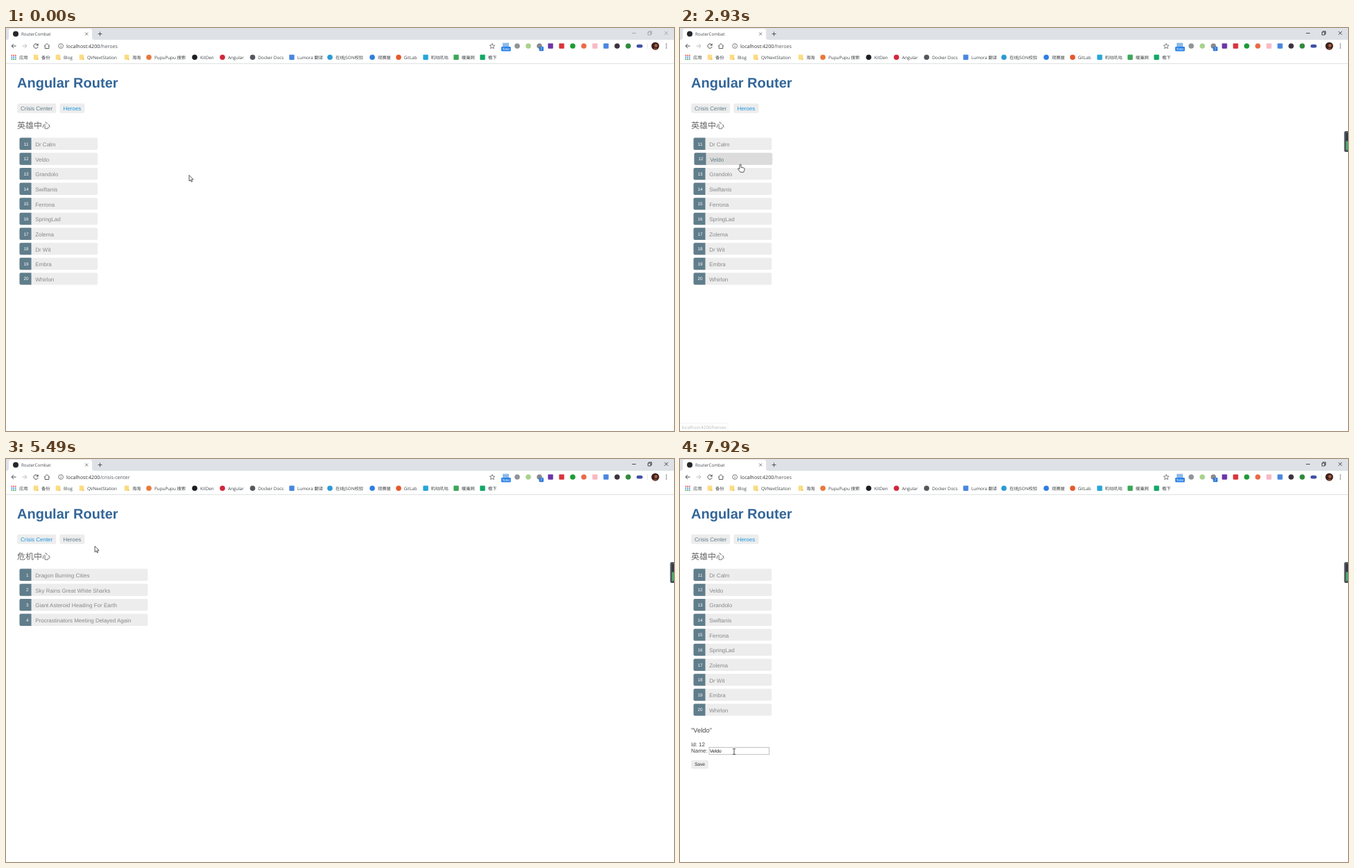
Write an HTML page that moves like this. It is 963 px wide and 582 px high and loops after 8000 ms.

```html
<!DOCTYPE html>
<html lang="en">
<head>
<meta charset="utf-8">
<title>RouterCombat</title>
<style>
  html, body { margin: 0; width: 100%; height: 100%; overflow: hidden; background: #fff; }
  svg { display: block; width: 963px; height: 582px; }
  text { white-space: pre; text-rendering: geometricPrecision; }
  .ui { font-family: "Open Sans", "Noto Sans CJK SC", "Noto Sans CJK", sans-serif; }
  .page { font-family: "Liberation Sans", "Noto Sans CJK SC", "Noto Sans CJK", sans-serif; }
</style>
</head>
<body>
<svg viewBox="0 0 963 582" xmlns="http://www.w3.org/2000/svg">
  <g id="chrome" class="ui"></g>
  <g id="page" class="page"></g>
  <g id="overlay" class="ui"></g>
</svg>
<script>
const LOOP = 8000;
const $ = id => document.getElementById(id);

const rect = (x, y, w, h, fill, extra = '') =>
  `<rect x="${x}" y="${y}" width="${w}" height="${h}" fill="${fill}" ${extra}/>`;
const dot = (x, y, r, fill) => `<circle cx="${x}" cy="${y}" r="${r}" fill="${fill}"/>`;
const text = (x, y, size, fill, str, extra = '') =>
  `<text x="${x}" y="${y}" font-size="${size}" fill="${fill}" ${extra}>${str}</text>`;
const line = (d, stroke, width = 1) =>
  `<path d="${d}" fill="none" stroke="${stroke}" stroke-width="${width}"/>`;

// ---- browser frame -------------------------------------------------

const bookmarks = [
  [11, 'apps', '#4285f4', '应用', 19],
  [43, 'folder', '', '备份', 51],
  [75, 'folder', '', 'Blog', 83],
  [109, 'folder', '', 'QVNextStation', 117],
  [174, 'folder', '', '海淘', 182],
  [206, 'dot', '#e8793a', 'PupuPupu 搜索', 214],
  [272, 'dot', '#1b1f23', 'KitDen', 280],
  [312, 'dot', '#d3273a', 'Angular', 320],
  [355.5, 'dot', '#55595e', 'Docker Docs', 363.5],
  [412, 'square', '#4a86e0', 'Lumora 翻译', 420],
  [467, 'dot', '#2c9ad6', '在线JSON校验', 475],
  [528, 'dot', '#2f7de0', '观赛屋', 536],
  [566, 'dot', '#e5582b', 'GitLab', 573.5],
  [605, 'square', '#27a5d8', '叽咕叽咕', 612.5],
  [649, 'square', '#3aa757', '暖巢网', 657],
  [687, 'square', '#12a866', '檐下', 695],
];

const extensions = [
  [737, 'dot', '#8f9499'], [753, 'dot', '#a9d18c'], [769, 'dot', '#8a8a8a'],
  [785, 'square', '#6a35a8'], [801, 'square', '#d8343c'], [817, 'dot', '#1d9a35'],
  [833, 'dot', '#ea6a45'], [849, 'square', '#f7b9c6'], [865, 'square', '#4a86e0'],
  [881, 'dot', '#3b3340'], [897, 'dot', '#2f8a3c'],
];

function icon(kind, x, y, color) {
  if (kind === 'dot') return dot(x, y, 3.8, color);
  if (kind === 'square') return rect(x - 3.7, y - 3.7, 7.4, 7.4, color, 'rx="1"');
  if (kind === 'folder') return rect(x - 3.3, y - 3.8, 6.6, 7.3, '#fbdc83', 'rx=".6"') +
    rect(x + 1, y + 1.6, 2.6, 2, '#f3c95c');
  const colors = ['#e34b3f', '#4285f4', '#34a060'];
  let out = '';
  for (let i = 0; i < 9; i++)
    out += rect(x - 3.5 + i % 3 * 2.7, y - 3.6 + (i / 3 | 0) * 2.7, 1.7, 1.7, colors[i / 3 | 0]);
  return out;
}

function drawFrame() {
  const ink = '#4a4d51';
  let s = rect(0, 0, 963, 17, '#dee1e6') + rect(0, 17, 963, 35, '#fff');
  s += '<path d="M1 17Q4 17 4 14V4Q4 1 7 1H121Q124 1 124 4V14Q124 17 127 17Z" fill="#fff"/>';
  s += dot(14, 8.5, 4, '#24272b') + text(22, 10.9, 6.2, '#45494d', 'RouterCombat');
  s += line('M114.2 6.5l4 4m0-4l-4 4', '#55585c', .8) + line('M132.5 8.5h6m-3-3v6', '#45484c', .9);

  s += line('M14.5 26h-6.5m3-3l-3 3l3 3', ink, 1);
  s += line('M23.5 26h6.5m-3-3l3 3l-3 3', '#babcbe', 1);
  s += line('M45.6 24A3.2 3.2 0 1 0 46.2 27', ink, 1) + '<path d="M46.6 22.3v3.2h-3.2z" fill="#4a4d51"/>';
  s += line('M55 26.3l4-3.8l4 3.8m-6.8-1v4.2h5.6v-4.2', ink, .9);
  s += line('M82.5 26a3.4 3.4 0 1 0-6.8 0a3.4 3.4 0 1 0 6.8 0M79.1 25.4v2.6M79.1 23.7v.9', ink, .7);
  s += line('M701 22.4l1.1 2.5 2.7.2-2.1 1.8.7 2.7-2.4-1.4-2.4 1.4.7-2.7-2.1-1.8 2.7-.2z', ink, .7);

  s += rect(716, 21.5, 9, 6, '#8dbbe8') + rect(714, 27, 13.7, 6.4, '#2680e8', 'rx="1"');
  s += text(720.8, 32, 5, '#fff', 'New', 'text-anchor="middle"');
  for (const [x, kind, color] of extensions) s += icon(kind, x, 26, color);
  s += rect(768.5, 27, 6.5, 6.3, '#2f7ad8', 'rx="1"') + text(771.7, 32, 5, '#fff', '7', 'text-anchor="middle"');
  s += rect(909, 23.8, 8.8, 4.8, '#3f4fa5', 'rx="2.4"');
  s += rect(924, 22, .6, 8, '#d5d7da');
  s += dot(936, 26, 5.6, '#3d211c') + dot(937, 25.4, 2.3, '#a55f43') +
    '<path d="M932.5 30.2q4-3.4 7.4 0q-3.6 2.6-7.4 0z" fill="#75402f"/>';
  for (const y of [23.3, 26, 28.7]) s += dot(952, y, .8, ink);

  for (const [x, kind, color, label, tx] of bookmarks)
    s += icon(kind, x, 42.3, color) + text(tx, 44.8, 6.3, '#3c4043', label);
  s += rect(0, 51, 963, .8, '#d9dbdd');
  $('chrome').innerHTML = s;
}

// ---- page ----------------------------------------------------------

const heroes = ['Dr Calm', 'Veldo', 'Grandolo', 'Swiftanis', 'Ferrona',
  'SpringLad', 'Zolema', 'Dr Wit', 'Embra', 'Whirlon'];
const crises = ['Dragon Burning Cities', 'Sky Rains Great White Sharks',
  'Giant Asteroid Heading For Earth', 'Procrastinators Meeting Delayed Again'];
const rowY = i => 158.6 + i * 21.65;

const areas = {
  crisis: { x: 16, y: 109, w: 56.3, h: 13.7 },
  heroes: { x: 77.4, y: 109, w: 36, h: 13.7 },
  input: { x: 42, y: 416.5, w: 86.6, h: 10.3 },
};
const inside = (p, { x, y, w, h }) => p.x >= x && p.x <= x + w && p.y >= y && p.y <= y + h;

function navLink(name, label, active, hover) {
  const { x, y, w, h } = areas[name];
  return rect(x, y, w, h, hover ? '#cfd8dc' : '#ededed', 'rx="2"') +
    text(x + 5, 118.5, 8, active || hover ? '#1c96e2' : '#607d8b', label);
}

function row(i, id, label, width, hover) {
  const y = rowY(i), x = hover ? 20.5 : 19.5;
  return rect(x, y, width, 17.4, hover ? '#dcdcdc' : '#ededed', 'rx="2"') +
    `<path d="M${x + 17} ${y}h-15q-2 0-2 2v13.4q0 2 2 2h15z" fill="#607d8b"/>` +
    text(x + 13, y + 11, 6.4, '#fff', id, 'text-anchor="end"') +
    text(x + 22.7, y + 12.4, 8, hover ? '#607d8b' : '#888', label);
}

function detail() {
  const { x, y, w, h } = areas.input;
  const name = heroes[1];
  return text(16, 395.3, 9.36, '#444', `"${name}"`) +
    text(16, 414.6, 8, '#444', 'Id: 12') + text(16, 424.2, 8, '#444', 'Name:') +
    rect(x, y, w, h, '#fff', 'stroke="#a5a5a5" stroke-width=".7"') +
    text(43, 424, 6.67, '#111', name) +
    rect(16, 435, 25, 12.4, '#ededed', 'rx="2"') + text(20.9, 443.4, 6.67, '#333', 'Save');
}

function drawPage(view) {
  const onCrisis = view.route === 'crisis-center';
  let s = text(16, 85.7, 20, '#336699', 'Angular Router', 'font-weight="bold"');
  s += navLink('crisis', 'Crisis Center', onCrisis, view.target === 'crisis');
  s += navLink('heroes', 'Heroes', !onCrisis, view.target === 'heroes');
  s += text(16, 145.2, 12, '#666', onCrisis ? '危机中心' : '英雄中心', 'font-weight="300"');
  const list = onCrisis ? crises : heroes;
  list.forEach((label, i) => {
    s += row(i, i + (onCrisis ? 1 : 11), label, onCrisis ? 185 : 112.7, view.target === i);
  });
  return s + (view.detail ? detail() : '');
}

// ---- timeline ------------------------------------------------------

// Bursts of screen updates: start, end, number of updates.
const bursts = [[0, 0, 1], [530, 620, 2], [770, 1390, 9], [1550, 2240, 10], [2390, 2390, 1],
  [2560, 3160, 9], [3320, 3320, 1], [4010, 4470, 7], [4620, 4700, 2], [4850, 5170, 5],
  [5340, 6130, 11], [6200, 6670, 7], [6840, 7070, 4], [7220, 7920, 10]];

// Pointer path: time, x, y.
const path = [[0, 264, 212.5], [529, 264, 212.5], [620, 258.7, 208.5], [690, 258.7, 208.5],
  [1390, 46, 116], [1700, 46, 116], [2010, 108, 131], [2240, 100, 117], [2390, 96, 111],
  [2600, 96, 111], [2840, 90, 186], [2930, 87, 197], [3160, 87, 187.5], [3320, 86, 193],
  [3930, 86, 193], [4010, 85, 167], [4470, 46, 113], [4780, 46, 113], [5170, 160, 130],
  [5260, 160, 130], [5495, 128.5, 126], [5720, 97, 114], [6050, 97, 116], [6130, 95, 128],
  [6670, 100, 194], [6840, 100, 194], [6990, 101, 198.6], [7070, 102, 201], [7140, 102, 201],
  [7480, 128, 330], [7700, 105, 400], [7840, 80, 421], [7920, 78, 422.5]];

// Updates fall on a 10 ms grid, so one may come slightly before its even share.
function snap(t) {
  const [a, b, n] = bursts.filter(u => u[0] <= t).pop();
  if (t >= b) return b;
  const step = (b - a) / (n - 1);
  return a + Math.floor((t - a) / step + .13) * step;
}

function pointer(t) {
  const i = path.findIndex(k => k[0] > t);
  const [t0, x0, y0] = path.at(i < 0 ? -1 : i - 1);
  if (i < 0) return { x: x0, y: y0 };
  const [t1, x1, y1] = path[i];
  const f = (t - t0) / (t1 - t0);
  return { x: x0 + (x1 - x0) * f, y: y0 + (y1 - y0) * f };
}

const between = (t, a, b) => t >= a && t < b;

function hit(p, view) {
  if (inside(p, areas.crisis)) return 'crisis';
  if (inside(p, areas.heroes)) return 'heroes';
  if (view.detail && inside(p, areas.input)) return 'input';
  const crisis = view.route === 'crisis-center';
  const count = crisis ? crises.length : heroes.length;
  for (let i = 0; i < count; i++)
    if (inside(p, { x: 19.5, y: rowY(i), w: crisis ? 185 : 113, h: 17.4 })) return i;
  return null;
}

// Status bar: route, start, start of fade, end.
const hints = [['crisis-center', 1550, 2240, 2240], ['heroes', 2240, 2900, 3000],
  ['crisis-center', 4620, 5300, 5400], ['heroes', 5720, 6300, 6400]];

function statusBar(t) {
  const hint = hints.find(([, start, , end]) => between(t, start, end));
  if (!hint) return '';
  const [route, , fade] = hint;
  const w = route === 'heroes' ? 69 : 85;
  return `<g opacity="${t >= fade ? .45 : 1}">` +
    rect(-1, 571, w + 1, 12, '#fff', 'rx="1.5" stroke="#dadce0" stroke-width=".7"') +
    text(2.5, 579, 6.24, '#5f6368', 'localhost:4200/' + route) + '</g>';
}

const shapes = {
  arrow: 'M0 0V8.6L2 6.8L3.3 9.7L4.6 9.1L3.4 6.3H6Z',
  hand: 'M-1 1q0-1 1-1t1 1v3.4l4 .9q1.2.3 1.1 1.5l-.6 2.7-.7 1.9h-4.8l-1.6-2-1.9-2.6q-.2-1 .8-1l1.7 1z',
};

function cursor({ x, y }, target) {
  const at = `transform="translate(${x.toFixed(1)} ${y.toFixed(1)})"`;
  if (target === 'input')
    return `<path ${at} d="M-2-4h1.5l.5.4.5-.4H2M0-3.6V3.6M-2 4h1.5l.5-.4.5.4H2" fill="none" stroke="#222" stroke-width=".8"/>`;
  const d = target === null ? shapes.arrow : shapes.hand;
  return `<path ${at} d="${d}" fill="#fff" stroke="#222" stroke-width=".75" stroke-linejoin="round"/>`;
}

function overlay(t, view, p) {
  const focused = t >= 1550;
  const ink = focused ? '#222' : '#999';
  let s = line('M902.5 7.5h5.5M925.5 6h4v4h-4zM926.8 6v-1.3h4v4h-1.3M949.3 4.8l5 5m0-5l-5 5', ink, .8);
  s += text(87, 28.6, 7.18, '#303236',
    `localhost:4200<tspan fill="#55595e">/${view.route}</tspan>`);
  if (focused) {
    s += rect(957.5, 149, 9, 30, '#4c525b', 'rx="2"') + rect(960, 152, 3, 11, '#353a42') +
      rect(960, 163.5, 3, 12.5, '#52a869');
  }
  return s + statusBar(t) + cursor(p, view.target);
}

let shown = -1;
function render(time) {
  const t = snap(time);
  if (t === shown) return;
  shown = t;
  const view = {
    route: between(t, 1550, 2560) || between(t, 4620, 6050) ? 'crisis-center' : 'heroes',
    detail: between(t, 3320, 4620) || t >= 6840,
  };
  // Hover trails the pointer by one update.
  view.target = hit(pointer(Math.max(0, t - 80)), view);
  $('page').innerHTML = drawPage(view);
  $('overlay').innerHTML = overlay(t, view, pointer(t));
}

function tick() {
  render(performance.now() % LOOP);
  requestAnimationFrame(tick);
}

drawFrame();
tick();
</script>
</body>
</html>
```
